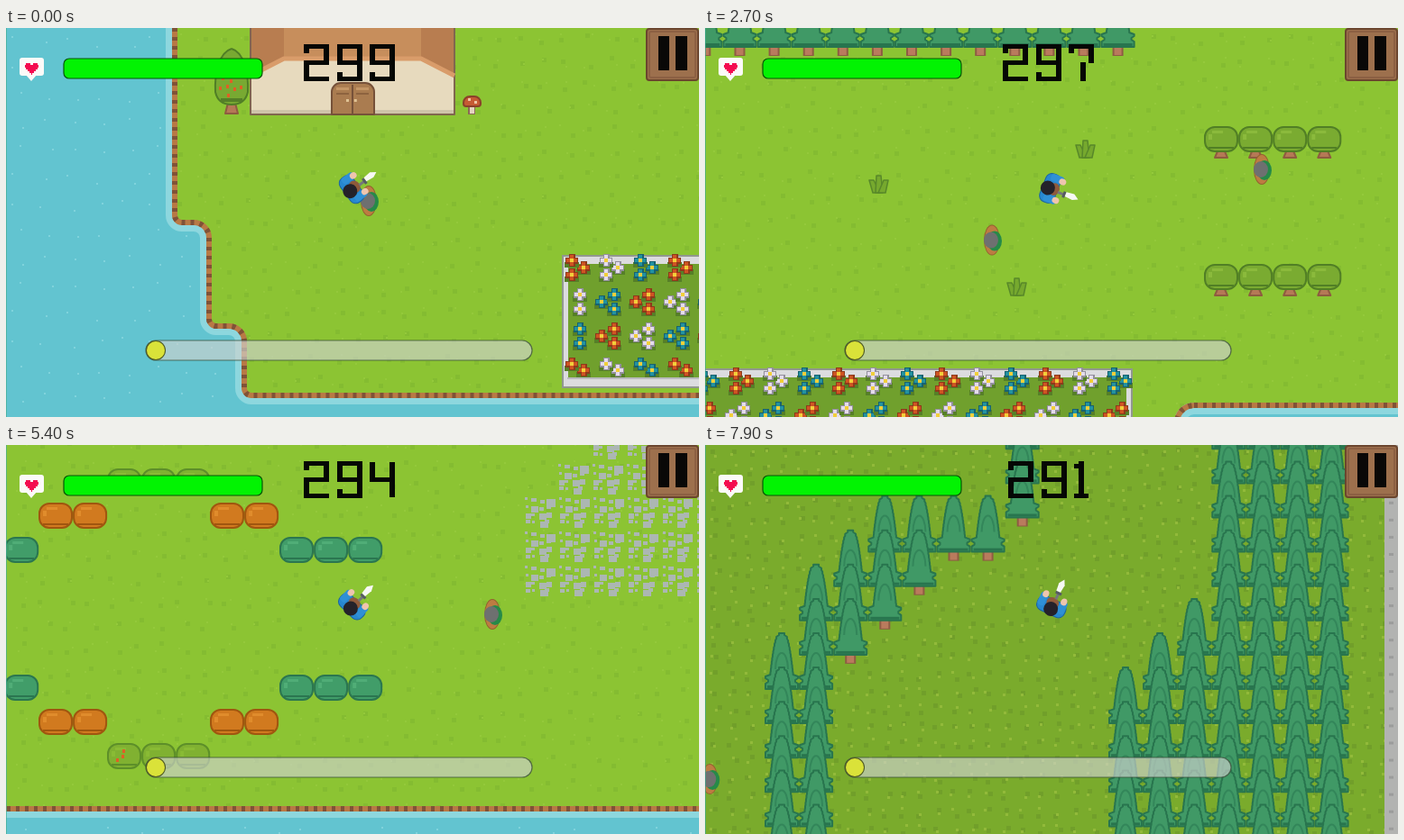
Animation, 768 px wide and 432 px high, one loop 8000 ms. Source, as an HTML page with a canvas:

```html
<!DOCTYPE html>
<html lang="en">
<head>
<meta charset="utf-8">
<title>Island walk</title>
<style>
html, body { margin: 0; width: 100%; height: 100%; overflow: hidden; background: #8cc433; }
canvas { display: block; width: 768px; height: 432px; }
</style>
</head>
<body>
<canvas id="stage" width="768" height="432" role="img" aria-label="Top-down game with a countdown"></canvas>
<script>
const W = 768, H = 432, T = 38.1, LOOP = 8000, STEP = 100;
const ctx = document.getElementById('stage').getContext('2d');

// Camera key points: time, x, y, then velocity in px per ms
const route = [
  [0, 0, 0, .3, -.22],
  [1900, 538, -105, .27, -.18],
  [3600, 973, -62, .45, 0],
  [5400, 1718, -111, .36, -.37],
  [6300, 2098, -368, -.11, -.48],
  [7200, 1986, -806, .24, -.43],
  [7900, 2108, -1138, .21, -.45]
];

// Walkers: time, place at that time, drift in px per ms
const walkers = [
  [0, 402, 192, 0, 0],
  [1900, 1065, 100, -.05, .012],
  [3600, 1270, 31, -.06, 0],
  [5400, 2257, 77, -.16, -.022],
  [6300, 2310, -347, 0, .06],
  [6300, 2222, -106, 0, .054],
  [6300, 2382, -37, -.15, -.06],
  [7200, 2009, -629, .149, -.197]
];

const leaf = {
  green: ['#7aab31', '#517f25', '#8bba3c'],
  teal: ['#419d69', '#2b7650', '#50ad77'],
  orange: ['#d17a1f', '#a0560f', '#e08c2c'],
  pale: ['#80b131', '#5d8f29', '#89bb35']
};
const petals = [['#cf5423', '#8d3a1b'], ['#e4dcec', '#93909c'], ['#2392a0', '#176270']];

function seeded(seed) {
  return () => (seed = (seed * 16807) % 2147483647) / 2147483647;
}

function box(color, x, y, w, h) {
  ctx.fillStyle = color;
  ctx.fillRect(x, y, w, h);
}

function poly(color, pts, edge, line = 2) {
  ctx.beginPath();
  pts.forEach(([x, y]) => ctx.lineTo(x, y));
  ctx.closePath();
  if (color) { ctx.fillStyle = color; ctx.fill(); }
  if (edge) { ctx.strokeStyle = edge; ctx.lineWidth = line; ctx.stroke(); }
}

function pill(x, y, w, h, r, fill, edge, line = 2) {
  ctx.beginPath();
  ctx.roundRect(x, y, w, h, r);
  if (fill) { ctx.fillStyle = fill; ctx.fill(); }
  if (edge) { ctx.strokeStyle = edge; ctx.lineWidth = line; ctx.stroke(); }
}

function disc(color, x, y, rx, ry = rx) {
  ctx.fillStyle = color;
  ctx.beginPath();
  ctx.ellipse(x, y, rx, ry, 0, 0, 7);
  ctx.fill();
}

// Repeating ground with jittered specks: [color, count per side, size]
function ground(base, specks, seed) {
  const size = 152, c = document.createElement('canvas'), rnd = seeded(seed);
  c.width = c.height = size;
  const g = c.getContext('2d');
  g.fillStyle = base;
  g.fillRect(0, 0, size, size);
  for (const [color, n, s] of specks) {
    g.fillStyle = color;
    for (let i = 0; i < n * n; i++) {
      const at = k => Math.round((k + .2 + rnd() * .5) * size / n);
      g.fillRect(at(i % n), at(Math.floor(i / n)), s, s);
    }
  }
  return ctx.createPattern(c, 'repeat');
}
const grass = ground('#8cc433', [['#84bc31', 6, 5], ['#94c93b', 6, 2]], 11);
const darkGrass = ground('#7aab2c', [['#719f2a', 8, 5], ['#92ba3a', 8, 3]], 29);
const water = ground('#62c4d0', [['#80d3dc', 5, 2]], 47);

function shore(trace, inside, band) {
  trace();
  ctx.lineJoin = 'round';
  ctx.strokeStyle = '#8dd7de';
  ctx.lineWidth = band;
  ctx.stroke();
  if (inside) { ctx.fillStyle = inside; ctx.fill(); }
  ctx.lineWidth = 6;
  ctx.strokeStyle = '#b87945';
  ctx.stroke();
  ctx.setLineDash([4, 6]);
  ctx.strokeStyle = '#805237';
  ctx.stroke();
  ctx.setLineDash([]);
}

function coast() {
  const corners = [[187, 216], [225, 216], [225, 331], [264, 331], [264, 408], [4000, 408]];
  ctx.beginPath();
  ctx.moveTo(187, -1400);
  for (let i = 0; i < 5; i++) ctx.arcTo(...corners[i], ...corners[i + 1], i % 2 ? 17 : 8);
  ctx.lineTo(4000, 408);
  ctx.lineTo(4000, -1400);
  ctx.closePath();
}

function pond() {
  ctx.beginPath();
  ctx.roundRect(1230, 293, 1800, 500, 19);
}

function land() {
  box(water, -400, -1400, 4400, 2200);
  shore(coast, grass, 20);
  box(darkGrass, 188, -1400, 3800, 926);
  pond();
  ctx.fillStyle = water;
  ctx.fill();
  ctx.save();
  ctx.clip();
  shore(pond, null, 20);
  ctx.restore();
  shore(pond, null, 6);
  box('#b2b3b1', 2861, -1400, 60, 926);
  for (let y = -1380; y < -480; y += T / 2) box('#9b9c9b', 2866, y, 5, 3);
}

// One paving tile, laid again and again
function paving(x, y) {
  const rnd = seeded(83);
  for (let i = 0; i < 16; i++) {
    const s = 3 + rnd() * rnd() * 9;
    box('#acb7b3', Math.round(x + i % 4 * 8 + rnd() * 3), Math.round(y + 1 + (i >> 2) * 8 + rnd() * 3),
      Math.round(s + rnd() * 2), Math.round(s));
  }
}

function cobbles(x, y, cols, rows) {
  for (let i = 0; i < cols * rows; i++) paving(x + i % cols * T, y + Math.floor(i / cols) * T);
}

function flower(x, y, kind) {
  const [light, dark] = petals[kind];
  box('#567f28', x - 8, y + 2, 16, 6);
  box(dark, x - 7, y - 3, 14, 7);
  box(dark, x - 3, y - 7, 7, 14);
  box(light, x - 6, y - 2, 12, 4);
  box(light, x - 2, y - 6, 4, 12);
  box('#f1cf3a', x - 2, y - 2, 4, 4);
}

// Three flowers in a triangle; the middle rows point left
function garden() {
  const gx = 617, gy = 252, w = 563, h = 148;
  box('#92978f', gx - 1, gy, w + 2, h);
  box('#dcdcdf', gx + 1, gy + 2, w - 2, h - 4);
  box('#70a02d', gx + 6, gy + 10, w - 12, h - 21);
  box('#b9babd', gx + 5, gy + 136, w - 10, 2);
  for (let i = 0; i < 60; i++) {
    const c = i % 15, row = Math.floor(i / 15), middle = row % 3 > 0;
    for (let k = 0; k < 3; k++) {
      if (middle && c === 0 && k === 0 || row === 3 && k === 1) continue;
      const a = k * Math.PI * 2 / 3, side = middle ? -1 : 1;
      flower(Math.round(gx + c * T + 14 + side * 9 * Math.cos(a)),
        Math.round(gy + 14 + row * T + 9 * Math.sin(a)), (c + row) % 3);
    }
  }
}

function trunk(x, y, h, flare) {
  poly('#b57956', [[x - 4, y], [x + 4, y], [x + flare, y + h], [x - flare, y + h]], '#8e5c40');
}

function bush(x, y, kind, rooted) {
  const [fill, edge, glow] = leaf[kind];
  if (rooted) trunk(x + 19, y + 28, 7, 7);
  pill(x + 1, y + 1, 36, 27, 11, fill, edge);
  box(glow, x + 9, y + 5, 12, 3);
  box(glow, x + 5, y + 9, 4, 6);
  box(edge, x + 5, y + 23, 28, 2);
}

function hedge(x, y, n, kind, rooted) {
  for (let i = 0; i < n; i++) bush(x + i * T, y, kind, rooted);
}

function berries(x, y, n, rx, ry) {
  const rnd = seeded(7);
  for (let i = 0; i < n; i++) {
    const a = i * 2.4, d = Math.sqrt((i + rnd()) / n);
    box('#de6025', Math.round(x + rx * d * Math.cos(a)), Math.round(y + ry * d * Math.sin(a)), 3, 4);
  }
}

function fruitTree(x, bottom) {
  const y = bottom - 73;
  trunk(x, y + 60, 12, 7);
  ctx.beginPath();
  ctx.moveTo(x, y);
  for (const s of [1, -1]) {
    ctx.moveTo(x, y);
    ctx.bezierCurveTo(x + s * 14, y + 4, x + s * 19, y + 28, x + s * 18, y + 48);
    ctx.quadraticCurveTo(x + s * 15, y + 62, x, y + 62);
  }
  ctx.fillStyle = '#78a932';
  ctx.fill();
  ctx.strokeStyle = '#507e26';
  ctx.lineWidth = 2;
  ctx.stroke();
  box('#547f28', x - 12, y + 55, 24, 4);
  berries(x - 2, y + 34, 10, 13, 21);
}

// Stepped arch that flares into a wide brim
function pine(x, y) {
  box('#8e5c43', x - 6, y + 61, 12, 11);
  box('#b97b5d', x - 4, y + 62, 8, 9);
  const right = [];
  for (let h = 0; h <= 60; h += 4) {
    const half = h < 48 ? 3 + 10 * Math.sqrt(h / 48) : 18 - 3 * (h === 52);
    right.push([half, h], [half, h + 2]);
  }
  const left = right.map(([a, h]) => [-a, h]).reverse();
  poly('#409966', [...right, ...left].map(([a, h]) => [x + a, y + h]), '#28754e');
  ctx.strokeStyle = '#33865a';
  ctx.beginPath();
  ctx.ellipse(x, y + 40, 7, 18, 0, Math.PI, 0);
  ctx.stroke();
  box('#28754e', x - 16, y + 58, 32, 3);
}

// First and last row of trees in a forest column
function span(c) {
  if (c < 0) return [9, 19];
  if (c < 2) return [-2 * c, 19];
  if (c < 7) return [Math.max(-4, -1 - c), Math.max(-4, 1 - c)];
  if (c === 7) return [-9, -5];
  if (c < 10) return [0, -1];
  return [c < 13 ? 11 - c : -9, c < 14 ? 19 : 10];
}

const pines = [];
function column(x, y, from, to) {
  for (let r = from; r <= to; r++) pines.push([x, y + r * T]);
}
for (let c = -5; c <= 16; c++) column(2193 + c * T, -929, ...span(c));
column(2193 - 5 * T, -929, 0, 2);
for (let i = 0; i < 17; i++) column(555 + i * T, -167, 0, 0);
pines.sort((a, b) => a[1] - b[1]);

function tuft(x, y) {
  for (let i = -1; i <= 1; i++) {
    poly('#76a92e', [[x + i * 3 - 4, y + 10], [x + i * 8 - 3, y - 9 + 5 * Math.abs(i)],
      [x + i * 8 + 2, y - 9 + 5 * Math.abs(i)], [x + i * 3 + 4, y + 10]], '#58882a', 1.5);
  }
}

function house(x, top, eave, slant, base, w) {
  const r = x + w, a = x + 37, b = r - 37;
  const ridge = [[x, top + 36], [a, top], [b, top], [r, top + 36]];
  const brim = [[r, eave + slant], [b, eave], [a, eave], [x, eave + slant]];
  box('#e7dabe', x, eave, w, base - eave);
  poly('#b87d50', [...ridge, ...brim]);
  box('#c78e5c', a, top, b - a, eave - top);
  poly(null, [...ridge, [r, base], [x, base]], '#80664f');
  ctx.strokeStyle = '#d99c6a';
  ctx.lineWidth = 5;
  ctx.beginPath();
  brim.forEach(p => ctx.lineTo(...p));
  ctx.stroke();
  box('#cfc3aa', x + 1, base - 5, w - 2, 4);
}

function door(x, y) {
  pill(x, y, 47, 35, [10, 10, 0, 0], '#aa7c50', '#765139');
  box('#765139', x + 22, y + 2, 2, 33);
  for (const a of [5, 27]) {
    box('#c39565', x + a, y + 5, 14, 3);
    box('#8d633f', x + a, y + 11, 14, 2);
    box('#e0c294', x + 14 + a * .4, y + 18, 3, 3);
  }
}

function mushroom(x, y) {
  box('#8b6757', x - 4, y + 9, 8, 12);
  box('#e4d4c0', x - 2, y + 9, 5, 11);
  pill(x - 9, y + 1, 19, 11, [7, 7, 3, 3], '#c65a34', '#8b402a');
  box('#efc4a4', x - 4, y + 3, 3, 3);
  box('#efc4a4', x + 3, y + 6, 3, 3);
}

function walker([t0, x0, y0, vx, vy], t) {
  const dt = Math.max(-1800, Math.min(1800, t - t0)), x = x0 + vx * dt, y = y0 + vy * dt;
  disc('#94602f', x, y, 9, 17);
  disc('#bd7c42', x, y, 8, 16);
  disc('#268a48', x + 3, y + 1, 8, 11);
  disc('#6e7070', x - 1, y, 8, 9);
}

function hero(angle) {
  ctx.save();
  ctx.translate(384, 178);
  ctx.rotate(angle);
  pill(-10, -16, 17, 33, 7, '#2787cf', '#1b639f', 1);
  for (const s of [-1, 1]) {
    pill(-5, s * 12 - 4, 15, 8, 3, '#2f90d6');
    disc('#efc5ae', 9, s * 11, 4, 3.5);
  }
  disc('#8f5a3b', 3, 0, 6, 7);
  disc('#24222a', -4, 1, 8);
  box('#75777b', 8, 0, 9, 3);
  box('#565b63', 14, -2, 3, 7);
  poly('#f7f8f4', [[17, -2], [26, -3], [32, 1], [26, 4], [17, 3]]);
  ctx.restore();
}

function scenery(cam) {
  land();
  cobbles(2366, -472, 2, 10);
  cobbles(2328, -91, 4, 1);
  cobbles(2291, -54, 6, 3);
  garden();
  house(271, -120, 34, 19, 96, 226);
  door(361, 61);
  house(2708, -131, 24, 38, 150, 229);
  mushroom(516, 75);
  for (const p of [[1129, 8], [900, 47], [1053, 161], [2690, 72]]) tuft(...p);
  for (const p of [[250, 96], [1545, -21], [1545, 248]]) fruitTree(...p);
  // The hedges mirror around one line
  const mirror = (gap, ...rest) => {
    for (const s of [-1, 1]) hedge(rest[0], 67.5 + s * gap, ...rest.slice(1));
  };
  mirror(76.5, 1640, 3, 'teal');
  mirror(76.5, 2021, 3, 'teal');
  mirror(114.5, 1754, 2, 'orange');
  mirror(114.5, 1944, 2, 'orange');
  mirror(152.5, 1830, 3, 'pale');
  mirror(76.5, 1260, 0, 'green');
  for (const y of [-17, 136]) hedge(1260, y, 4, 'green', true);
  berries(1846, 233, 3, 10, 7);
  for (const [x, y] of pines) {
    const sx = x - cam.x, sy = y - cam.y;
    if (sx > -25 && sx < W + 25 && sy > -80 && sy < H + 5) pine(x, y);
  }
}

// Bars of a digit: a-g as on a segment display, s and z are short hooks, m a centre stem
const bars = {
  a: [0, 0, 28, 5], g: [0, 18, 28, 5], d: [0, 36, 28, 5],
  f: [0, 1, 6, 20], b: [22, 1, 6, 20], e: [0, 20, 6, 20], c: [22, 20, 6, 20],
  s: [0, 1, 6, 9], z: [0, 31, 6, 9], m: [13, 20, 6, 21]
};
const digits = {
  2: 'sabged', 3: 'sabgcdz', 4: 'fbgc', 5: 'afgcdz', 6: 'afgecd',
  7: 'sabm', 8: 'abcdefg', 9: 'abcdfgz'
};

function counter(n) {
  const text = String(n), size = d => (d === '1' ? 16 : 28);
  let x = 380.5 - ([...text].reduce((s, d) => s + size(d) + 8.5, -8.5)) / 2;
  for (const d of text) {
    const left = Math.round(x), bar = (a, b, w, h) => box('#050705', left + a, 18 + b, w, h);
    if (d === '1') {
      bar(0, 3, 11, 5);
      bar(5, 0, 6, 41);
      bar(0, 36, 16, 5);
    } else {
      for (const k of digits[d]) bar(...bars[k]);
    }
    x += size(d) + 8.5;
  }
}

function heart() {
  pill(15, 33, 27, 20, 3, '#fbfaf8');
  poly('#fbfaf8', [[22, 52], [34, 52], [28, 59]]);
  box('#f40b50', 22, 39, 5, 2);
  box('#f40b50', 30, 39, 5, 2);
  box('#f40b50', 21, 41, 15, 3);
  for (let r = 0; r < 4; r++) box('#f40b50', 22 + r * 2, 44 + r * 2, 13 - r * 4, 2);
}

function hud(t) {
  heart();
  pill(64, 34, 220, 22, 6, '#02f302', '#075607', 1.2);
  counter(299 - Math.floor((t + 200) / 1000));
  pill(155, 347, 428, 22, 11, 'rgba(207,211,207,.65)', 'rgba(55,75,55,.75)', 1.2);
  disc('#4d5822', 166, 358, 11);
  disc('#dae239', 166, 358, 10);
  pill(710, 1, 57, 57, 3, '#9d704d', '#6b452e');
  pill(713, 4, 51, 51, 2, null, '#8c6043');
  box('#090807', 723, 9, 12, 38);
  box('#090807', 742, 9, 13, 38);
}

// Cubic Hermite position, with heading from its slope
function cameraAt(t) {
  let i = 0;
  while (i < route.length - 2 && t >= route[i + 1][0]) i++;
  const a = route[i], b = route[i + 1], d = b[0] - a[0], u = Math.min(1, (t - a[0]) / d);
  const axis = k => {
    const gap = b[k] - a[k], v = a[k + 2] * d, w = b[k + 2] * d;
    const c2 = 3 * gap - 2 * v - w, c3 = v + w - 2 * gap;
    return [a[k] + u * (v + u * (c2 + u * c3)), v + u * (2 * c2 + u * 3 * c3)];
  };
  const [x, dx] = axis(1), [y, dy] = axis(2);
  return { x: Math.round(x), y: Math.round(y), angle: Math.atan2(dy, dx) };
}

function draw(t) {
  const cam = cameraAt(t);
  ctx.save();
  ctx.translate(-cam.x, -cam.y);
  scenery(cam);
  for (const w of walkers) walker(w, t);
  ctx.restore();
  hero(cam.angle);
  box('rgba(70,175,150,.7)', 0, 0, 1, H);
  hud(t);
}

const start = performance.now();
function tick() {
  const t = (performance.now() - start) % LOOP;
  draw(Math.floor(t / STEP) * STEP);
  requestAnimationFrame(tick);
}
tick();
</script>
</body>
</html>
```
